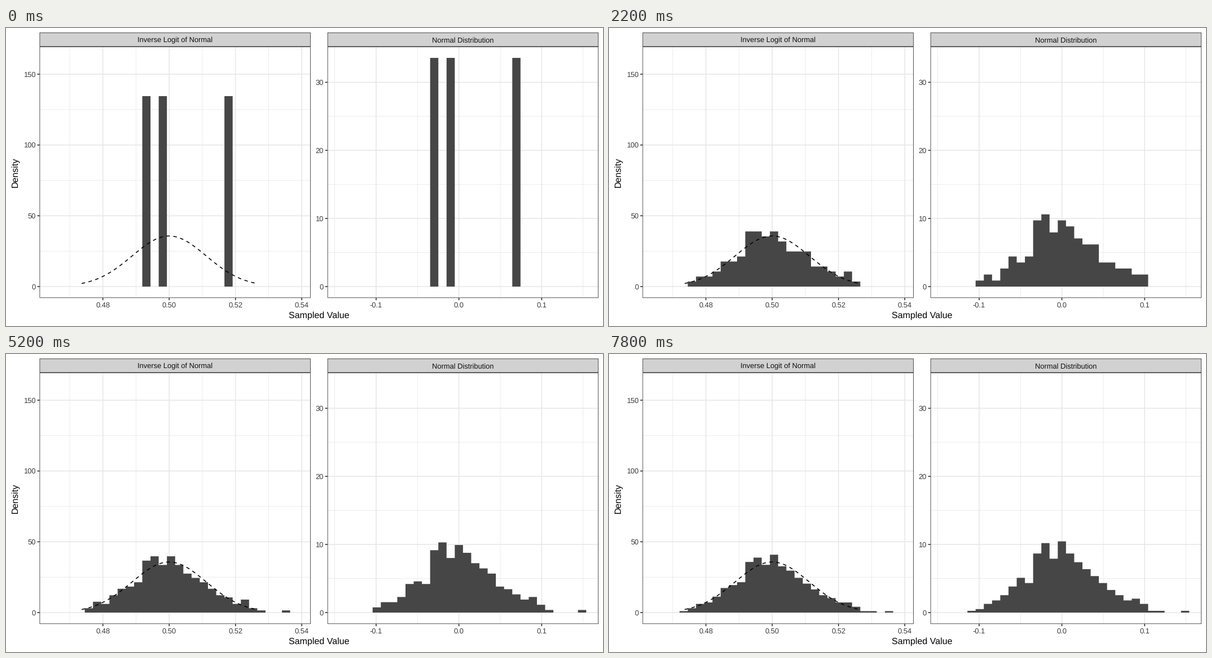
A matplotlib script for the animation above (8000 ms loop, 1058 by 529 pixels).

```python
import matplotlib.pyplot as plt
import numpy as np
from matplotlib.animation import FuncAnimation
from matplotlib.patches import Polygon, Rectangle

W, H, DPI = 1058, 529, 64
PX = 72 / DPI  # points per pixel
FRAMES, INTERVAL = 40, 200

STRIP_TOP, TOP, BOTTOM, BASE = 8.0, 33.2, 479.2, 459
PANEL_W = 480.3
LW = 1.556
GOLDEN = 0.618034

BAR, STRIP, GRID, GRID_MINOR = "#464646", "#d1d1d1", "#e7e7e7", "#e7e7e7"
BORDER, LABEL, STRIP_TEXT = "#242424", "#3b3b3b", "#101010"

plt.rcParams["font.family"] = "Liberation Sans"
plt.rcParams["text.hinting"] = "none"
plt.rcParams["path.snap"] = False

fig = plt.figure(figsize=(W / DPI, H / DPI), dpi=DPI, facecolor="white")
ax = fig.add_axes([0, 0, 1, 1])
ax.set_xlim(0, W)
ax.set_ylim(H, 0)
ax.axis("off")


def line(xs, ys, color, width, z, **style):
    ax.plot(xs, ys, color=color, lw=width * PX, zorder=z,
            solid_capstyle="butt", dash_capstyle="butt", **style)


def label(x, y, text, size=12.9, color=LABEL, ha="center", **style):
    ax.text(x, y, text, fontsize=size * PX, color=color, ha=ha,
            va="baseline", zorder=6, **style)


def box(x, y0, y1, fill, z):
    """Panel-wide box whose border lies just inside its edges."""
    lw = LW / 2
    ax.add_patch(Rectangle((x + lw / 2, y0 + lw / 2), PANEL_W - lw, y1 - y0 - lw,
                           facecolor=fill, edgecolor=BORDER, lw=lw * PX,
                           joinstyle="miter", zorder=z))


def inverse_logit(v):
    return 1 / (1 + np.exp(-v))


def draw_samples(width):
    """Normal draws in order of arrival, spread evenly over time."""
    counts = [1, 2, 5, 7, 10, 15, 20, 17, 33, 40, 30, 41,
              34, 29, 25, 21, 17, 13, 9, 7, 8, 5, 1, 1]
    pool = np.concatenate([(b - 0.5 + (np.arange(c) + 0.5) / c) * width
                           for b, c in enumerate(counts, start=-11)])
    arrival = (0.95 + GOLDEN * np.arange(len(pool))) % 1
    draws = np.concatenate([[-0.03, -0.01, 0.07], pool[np.argsort(arrival)]])
    return np.insert(draws, 130, 0.1455)  # the lone outlier


class Panel:
    def __init__(self, left, title, samples, width, first_bin, x_ref, x_scale,
                 y_scale):
        self.left, self.right = left, left + PANEL_W
        self.x_ref, self.x_scale, self.y_scale = x_ref, x_scale, y_scale
        self.samples = samples
        self.edges = (first_bin - 0.5 + np.arange(31)) * width
        self.outline_x = np.repeat(self.x(self.edges), 2)
        self.bars = ax.add_patch(Polygon([[0, 0], [1, 1]], facecolor=BAR,
                                         edgecolor="none", zorder=3))
        box(left, STRIP_TOP, TOP, STRIP, 2)
        box(left, TOP, BOTTOM, "none", 5)
        label(left + PANEL_W / 2, 25.5, title, color=STRIP_TEXT)

    def x(self, value):
        return self.x_ref[1] + (value - self.x_ref[0]) * self.x_scale

    def y(self, value):
        return BASE - value * self.y_scale

    def x_axis(self, major, minor, digits):
        for v in minor:
            line([self.x(v)] * 2, [TOP, BOTTOM], GRID_MINOR, LW / 2, 0)
        for v in major:
            x = self.x(v)
            line([x, x], [TOP, BOTTOM], GRID, LW, 1)
            line([x, x], [BOTTOM, BOTTOM + 4], BORDER, LW, 4)
            label(x, 496, f"{v:.{digits}f}")

    def y_axis(self, major, minor):
        for v in minor:
            line([self.left, self.right], [self.y(v)] * 2, GRID_MINOR, LW / 2, 0)
        for v in major:
            y = self.y(v)
            line([self.left, self.right], [y, y], GRID, LW, 1)
            line([self.left - 4, self.left], [y, y], BORDER, LW, 4)
            label(self.left - 7, y + 4.6, str(v), ha="right")

    def show(self, n):
        density, _ = np.histogram(self.samples[:n], self.edges, density=True)
        outline_y = np.concatenate([[BASE], np.repeat(self.y(density), 2), [BASE]])
        self.bars.set_xy(np.column_stack([self.outline_x, outline_y]))


BIN = 0.009925
samples = draw_samples(BIN)

logit = Panel(59.5, "Inverse Logit of Normal", inverse_logit(samples),
              0.002478, 188, (0.5, 289.2), 5875, 2.5133)
logit.x_axis([0.48, 0.50, 0.52, 0.54], [0.47, 0.49, 0.51, 0.53], 2)
logit.y_axis(range(0, 151, 50), range(25, 126, 50))

normal = Panel(569.7, "Normal Distribution", samples,
               BIN, -14, (0, 802.6), 1467, 12.087)
normal.x_axis([-0.1, 0.0, 0.1], [-0.15, -0.05, 0.05, 0.15], 1)
normal.y_axis(range(0, 31, 10), range(5, 36, 10))

# Theoretical density over the left histogram.
SD = 0.01117
grid = np.linspace(0.4736, 0.5264, 120)
curve = np.exp(-((grid - 0.5) / SD) ** 2 / 2) / (SD * np.sqrt(2 * np.pi))
line(logit.x(grid), logit.y(curve), "black", LW, 4, linestyle=(0, (4, 4)))

label(554.8, 515, "Sampled Value", size=16.05, color="black")
label(20.4, 256, "Density", size=16.05, color="black",
      rotation=90, rotation_mode="anchor")


def update(frame):
    n = round(3 + 10.05 * frame)
    logit.show(n)
    normal.show(n)
    return logit.bars, normal.bars


anim = FuncAnimation(fig, update, frames=FRAMES, interval=INTERVAL,
                     repeat=True, repeat_delay=0, blit=False)
plt.show()
```
